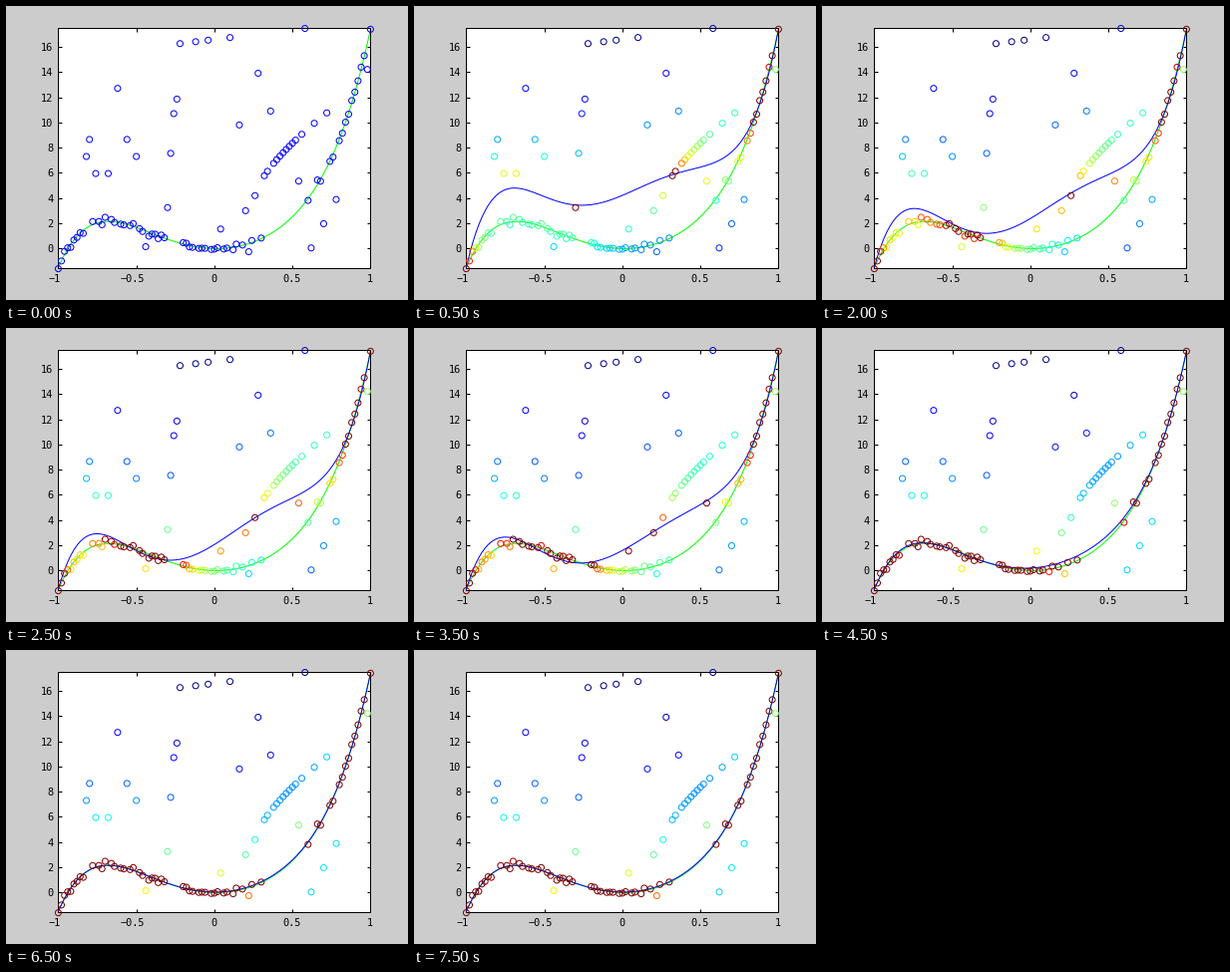
Write a matplotlib script that moves like this. It is 403x295 px and loops after 8000 ms.

```python
import numpy as np
import matplotlib.pyplot as plt
from matplotlib.animation import FuncAnimation

W, H, DPI = 403, 295, 100
PX = 72 / DPI
FRAMES = 16
LEFT, RIGHT, TOP, BOTTOM = 52.4, 365.4, 22.4, 263.4
XLIM, YLIM = (-1, 1), (-1.58, 17.46)
GREEN, BLUE = "#00ff00", "#0000ff"
CLIP = 0.31  # residuals below this count as a perfect hit

xs = np.linspace(-1, 1, 101)
truth = np.polyval([7.25, -.6, 2.4, 8.55, -.2, 0], xs)


def samples():
    """Noisy readings of the true curve with gross outliers."""
    rng = np.random.default_rng(4)
    y = truth + rng.normal(0, .15, xs.size)

    def put(where, rule):
        i = np.array(where)
        y[i] = rule(i)

    put([9, 10, 12, 16, 22, 25], lambda i: 7.3 - 1.35 * np.cos(np.pi * i / 2))
    put(range(35, 39), lambda i: 3.25 + 8.6 * np.sin(np.pi * (i - 35) / 6))
    put([39, 44, 48, 55, 79], lambda i: 16.4 + .03 * (i - 44))
    put([63, 66, 67, *range(69, 77), 78, 82, 86],
        lambda i: 4.2 + .73 * (i - 63) ** .7)
    put([64, 68], lambda i: 13.9 - .75 * (i - 64))
    put([81, 85, 89], lambda i: .05 + .48 * (i - 81))
    loners = {19: 12.7, 28: .15, 52: 1.55, 58: 9.8, 60: 3.0,
              61: -.25, 77: 5.35, 99: 14.2}
    for i, v in loners.items():
        y[i] = v
    return y


ys = samples()


def fit(t):
    """Quintic that settles onto the true curve as the iterations go on."""
    pull = .02 + .98 / (1 + np.exp(2.03 * (t - 7.84)))
    lift = 3 * np.exp(-t * t / 10) - .4 * pull
    return truth + (1 - xs ** 2) * (.87 - xs) * (
        13.7 * pull * (xs + .43) ** 2 + lift)


def weight_colors(curve):
    r = np.maximum(np.abs(ys - curve), CLIP)
    return plt.cm.jet(np.log(r.max() / r) / np.log(r.max() / CLIP))


fig = plt.figure(figsize=(W / DPI, H / DPI), dpi=DPI, facecolor="#cccccc")
ax = fig.add_axes([LEFT / W, 1 - BOTTOM / H,
                   (RIGHT - LEFT) / W, (BOTTOM - TOP) / H])
ax.set(xlim=XLIM, ylim=YLIM)
xticks, yticks = np.linspace(-1, 1, 5), range(0, 17, 2)
ax.set_xticks(xticks, [])
ax.set_yticks(yticks, [])
ax.tick_params(direction="in", top=True, right=True,
               length=3.5 * PX, width=PX)
for spine in ax.spines.values():
    spine.set_linewidth(PX)


def label(text, x, y, ha):
    fig.text(x / W, 1 - y / H, text, ha=ha, va="center_baseline",
             family="DejaVu Sans Mono", size=10.3 * PX)


for v in xticks:
    px = np.interp(v, XLIM, (LEFT, RIGHT)) - (4 if v < 0 else .7)
    label(f"{v:g}".replace("-", "\u2212"), px, 273, "center")
for v in yticks:
    label(str(v), 47.5, np.interp(v, YLIM, (BOTTOM, TOP)), "right")

ax.plot(xs, truth, color=GREEN, lw=PX, zorder=2)
blue, = ax.plot([], [], color=BLUE, lw=PX, zorder=3)
dots = ax.scatter(xs, ys, s=(6 * PX) ** 2, facecolors="none",
                  edgecolors=BLUE, linewidths=PX, clip_on=False, zorder=4)


def draw(i):
    if i == 0:
        blue.set_data([], [])
        dots.set_edgecolor(BLUE)
    else:
        curve = fit(i)
        blue.set_data(xs, curve)
        dots.set_edgecolor(weight_colors(curve))
    return blue, dots


anim = FuncAnimation(fig, draw, frames=FRAMES, interval=500,
                     repeat=True, repeat_delay=0)
plt.show()
```
